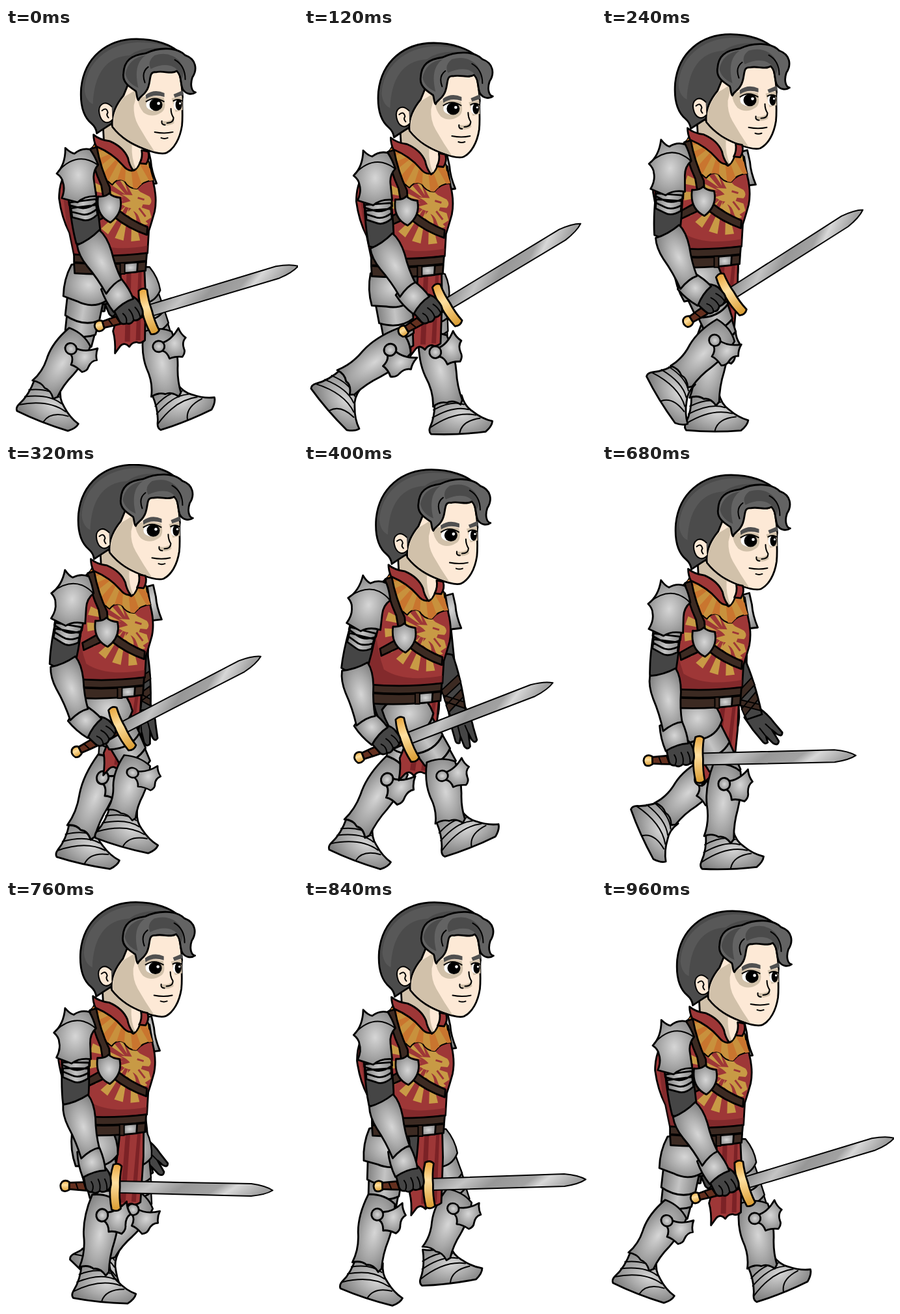
Recreate the animation shown at these times as an HTML page. Size 449 by 627 pixels, loop 1 s.

```html
<!DOCTYPE html>
<html lang="en">
<head>
<meta charset="utf-8">
<title>Walking knight</title>
<style>
  html, body { margin: 0; width: 100%; height: 100%; overflow: hidden; background: #fff; }
  svg { display: block; width: 449px; height: 627px; }
  .ink { stroke: #000; stroke-width: 2.8; stroke-linejoin: round; stroke-linecap: round; }
  .thin { stroke: #000; stroke-width: 2; stroke-linejoin: round; stroke-linecap: round; }
  .line { fill: none; }
  .steel { fill: url(#steel); }
  .plate { fill: url(#plate); }
  .cloth { fill: #454545; }
  .red { fill: #9e3737; }
  .strap { fill: #3c2a22; }
  .gold { fill: url(#gold); }
  .skin { fill: #fde9d6; }
  .shade { fill: #d1c1aa; }
  .hair { fill: #4b4b4b; }
  .lock { fill: #636363; }
</style>
</head>
<body>
<svg viewBox="0 0 449 627">
  <defs>
    <radialGradient id="steel" cx=".52" cy=".5" r=".62">
      <stop offset="0" stop-color="#d6d6d6"/><stop offset=".55" stop-color="#a8a8a8"/><stop offset="1" stop-color="#808080"/>
    </radialGradient>
    <linearGradient id="plate" x1="0" x2="1">
      <stop offset="0" stop-color="#7d7d7d"/><stop offset=".5" stop-color="#c4c4c4"/><stop offset="1" stop-color="#858585"/>
    </linearGradient>
    <linearGradient id="blade" x1="0" x2="1" y2=".12">
      <stop offset="0" stop-color="#8c8c8c"/><stop offset=".25" stop-color="#c4c4c4"/><stop offset=".45" stop-color="#979797"/>
      <stop offset=".68" stop-color="#a2a2a2"/><stop offset=".78" stop-color="#d8d8d8"/><stop offset="1" stop-color="#a0a0a0"/>
    </linearGradient>
    <linearGradient id="gold" x2="0" y2="1">
      <stop offset="0" stop-color="#e8a53a"/><stop offset=".4" stop-color="#ffe0a0"/><stop offset="1" stop-color="#d99a2e"/>
    </linearGradient>
    <path id="tunicShape" d="M140 178 L106 208 Q82 225 82 262 Q86 292 98 315 L105 349 Q160 354 218 346 L220 312 Q224 300 229 282 Q233 262 227 238 L222 208 L205 200Z"/>
    <path id="yokeShape" d="M140 172 L130 190 Q141 204 146 214 Q154 236 164 241 Q172 230 182 235 Q190 248 202 247 Q211 235 227 234 Q222 222 220 205 L205 195 L190 190Z"/>
    <clipPath id="tunicClip"><use href="#tunicShape"/></clipPath>
    <clipPath id="yokeClip"><use href="#yokeShape"/></clipPath>

    <g id="thighArt" class="ink plate">
      <path d="M-20 78 Q0 70 24 78 L22 101 Q0 112 -19 101Z"/>
      <path d="M-24 54 Q0 46 27 54 L25 82 Q2 95 -22 83Z"/>
      <path d="M-28 30 Q0 22 28 30 L27 60 Q4 74 -26 61Z"/>
      <path class="steel" d="M-30 -16 Q0 -26 30 -13 Q38 8 33 28 Q14 45 -12 37 L-34 33 Q-38 8 -30 -16Z"/>
    </g>
    <g id="shinArt" class="ink">
      <path class="steel" d="M-24 -14 Q0 -20 19 -8 Q25 18 21 48 Q17 70 20 92 L16 98 Q6 88 -4 91 Q-14 86 -26 92 Q-20 70 -27 46 Q-33 20 -24 -14Z"/>
      <path class="steel" d="M1 8 Q17 6 30 -12 Q32 -2 39 5 Q32 11 34 22 Q36 29 30 35 Q18 32 10 35 Q8 24 1 21Z"/>
      <circle class="steel" cx="-4" cy="13" r="9"/>
    </g>
    <g id="footArt" class="ink">
      <path class="steel" d="M-23 -8 Q-2 -2 19 -11 Q23 6 35 14 Q49 26 65 30 Q64 38 54 46 Q10 50 -30 47 Q-34 43 -31 36 Q-22 18 -23 -8Z"/>
      <path class="line thin" d="M-25 10 Q2 -4 22 3 M-27 22 Q6 4 29 11 M-31 37 Q8 12 40 20 M14 47 Q18 28 46 25"/>
    </g>
  </defs>

  <g id="farArm">
    <g id="farUpper"><path class="cloth ink" d="M-15 0 L15 0 L16 104 Q0 112 -14 102Z"/></g>
    <g id="farHand"><path class="cloth ink" d="M-13 -6 L13 -8 Q20 12 20 26 L22 46 Q18 52 14 44 L11 34 L10 54 Q5 60 1 52 L-2 37 L-5 46 Q-11 47 -11 39 L-13 18Z"/>
      <path class="line thin" d="M8 21 L11 34 M-3 21 L-2 37"/></g>
    <g id="farFore">
      <path class="cloth ink" d="M-16 -7 Q0 -14 15 -5 Q19 30 13 86 L-12 86 Q-15 40 -16 -7Z"/>
      <path class="strap thin" d="M-15 44 L16 27 L17 39 L-14 56Z M-14 68 L15 50 L15 62 L-13 80Z M-14 52 L14 70 L13 80 L-14 62Z"/>
    </g>
  </g>
  <path id="farPauldron" class="steel ink" d="M216 198 L224 207 L235 204 L239 222 Q240 238 248 257 L230 259 L218 250Z"/>

  <g id="farThigh"><use href="#thighArt" transform="scale(.82 1)"/></g>
  <g id="farFoot"><use href="#footArt"/></g>
  <g id="farShin"><use href="#shinArt"/></g>

  <g id="pelvis"><path class="cloth ink" d="M110 365 L212 365 Q216 395 202 416 L150 425 Q118 420 110 365Z"/></g>
  <g id="strip">
    <path class="red ink" d="M177 366 L213 366 L215 410 L214 480 Q207 486 202 483 Q195 482 190 490 Q182 482 176 489 L168 500 Q169 480 165 466 Q176 430 177 366Z"/>
    <path fill="#7b2226" d="M186 370 L193 370 L191 482 L183 482Z M204 372 L209 372 L207 480 L200 480Z"/>
  </g>

  <g id="nearThigh"><use href="#thighArt"/></g>
  <g id="nearFoot"><use href="#footArt"/></g>
  <g id="nearShin"><use href="#shinArt"/></g>

  <g id="torso">
    <use href="#tunicShape" class="red ink"/>
    <g clip-path="url(#tunicClip)">
      <path id="sun" fill="#c89a45"/>
      <path fill="#c89a45" d="M186 240 Q199 243 207 252 L221 259 Q227 266 221 272 L211 271 L209 276 L221 280 L224 291 L215 297 L219 301 Q209 306 206 294 Q203 284 196 281 Q204 294 199 302 Q193 290 185 286 L193 277 Q184 276 178 270 L192 266 Q186 259 178 256 L195 257Z"/>
      <path class="line" stroke="#9e3737" stroke-width="3" d="M203 261 L213 264 M205 277 L215 290"/>
      <path fill="#6b1f22" opacity=".5" d="M80 190 H118 Q108 270 128 325 Q160 346 220 334 V354 H100Z"/>
    </g>
    <use href="#yokeShape" fill="#c8913d" class="thin"/>
    <path id="yokeRays" clip-path="url(#yokeClip)" fill="#c9752f"/>
    <path class="strap ink" d="M130 186 L140 183 Q146 216 160 245 L161 260 L150 260 L147 242 Q134 214 130 186Z"/>
    <path class="strap ink" d="M172 279 Q193 296 218 306 L217 318 Q188 308 166 290Z M147 279 L122 293 L124 304 L152 291Z"/>
    <path class="steel ink" d="M142 259 Q154 260 159 254 Q165 260 176 261 Q181 284 161 299 Q138 288 142 259Z"/>
    <path class="strap ink" d="M105 348 Q160 353 217 346 L216 358 Q160 365 105 360Z M105 361 Q160 366 216 359 L215 373 Q160 381 106 377Z"/>
    <path class="steel ink" d="M180 362 L203 360 L202 375 L180 377Z"/>
    <path class="strap thin" d="M176 361 L183 361 L183 378 L176 378Z"/>
  </g>

  <g id="head">
    <path class="shade ink" d="M148 140 L198 172 L208 196 Q205 214 196 219 Q188 215 185 200 L150 176Z"/>
    <path class="skin" d="M193 180 L210 186 Q207 204 199 216 Q192 200 193 180Z"/>
    <path class="hair ink" d="M139 162 Q138 153 131 147 C113 132 114 105 115 92 C120 45 155 17 200 17 C228 17 256 26 268 40 L268 90 L165 145 L148 156Z"/>
    <path fill="#585858" d="M120 95 C122 54 155 24 202 22 C230 22 250 28 259 34 C228 27 204 31 190 42 C152 44 135 72 133 117 Q122 112 120 95Z"/>
    <path class="skin ink" d="M163 152 C161 137 166 121 180 104 L194 70 L264 62 C270 83 270 94 271 106 C269 114 272 130 270 150 C267 170 258 186 246 192 C238 195 225 191 212 186 C194 179 177 170 163 152Z"/>
    <path class="shade" d="M165 151 C163 137 168 121 181 106 L199 95 Q200 106 196 119 Q195 136 203 150 Q215 171 228 190 C202 181 179 171 165 151Z"/>
    <path class="shade" d="M202 108 Q219 102 242 107 Q247 125 238 130 Q224 139 211 130 Q203 121 202 108Z M254 108 L270 105 L271 126 L260 129Z M239 143 Q251 145 257 138 L258 146 Q248 153 239 147Z"/>
    <path class="skin thin" d="M162 121 C151 110 140 118 143 132 C146 146 156 149 163 141"/>
    <path class="line thin" d="M147 127 Q154 121 156 130 Q153 134 157 138"/>
    <ellipse cx="227" cy="118" rx="12" ry="9" fill="#fff"/>
    <ellipse cx="230" cy="118" rx="10" ry="9.5"/>
    <circle cx="234" cy="116" r="2.3" fill="#fff"/>
    <ellipse cx="263" cy="118" rx="6" ry="8.5" fill="#fff"/>
    <ellipse cx="265" cy="118" rx="5" ry="8.5"/>
    <circle cx="267" cy="116" r="1.6" fill="#fff"/>
    <path class="line thin" d="M215 113 Q228 104 242 113 M257 112 Q263 108 270 112"/>
    <path class="line thin" stroke-width="1.5" d="M253 124 Q253 132 257 138 Q257 146 247 146 M239 143 Q238 149 244 149"/>
    <path fill="#505050" d="M214 103 Q227 93 243 100 L243 106 Q226 101 215 109Z M257 102 L271 96 L272 103 L259 107Z"/>
    <path class="line thin" d="M228 160 Q243 163 256 160 M238 169 Q243 171 248 169"/>
    <path class="lock ink" d="M180 70 C181 50 192 42 214 39 C235 29 262 29 275 42 C292 48 294 64 286 76 C282 88 285 98 291 99 C284 104 275 101 271 94 C267 84 270 74 262 66 C254 72 241 65 230 68 C217 66 224 85 215 97 C211 104 205 105 203 111 C200 108 201 101 199 97 C190 91 178 84 180 70Z"/>
    <path class="hair" d="M183 70 Q188 46 214 42 Q194 56 203 92 Q186 85 183 70Z M228 42 Q252 35 267 52 Q276 66 270 78 Q266 62 252 58 Q238 55 222 63 Q216 51 228 42Z"/>
    <path class="line thin" d="M218 60 Q207 68 213 84 M259 49 Q275 58 275 79"/>
  </g>

  <g id="collar">
    <path class="red ink" d="M135 164 Q144 172 160 174 Q181 183 188 200 Q190 211 196 219 Q188 221 180 211 Q165 193 139 182Q135 173 135 164Z"/>
    <path class="red ink" d="M209 188 L219 190 Q222 200 216 209 L206 208 Q211 199 209 188Z"/>
  </g>

  <g id="sword">
    <path class="thin" fill="url(#blade)" d="M4 -9 L208 -9.5 Q230 -7 241 0 Q230 7 208 9.5 L4 9Z"/>
    <path class="ink" fill="#65301f" d="M-72 -5 Q-38 -8 -6 -5 L-6 6 Q-38 8 -72 5Z"/>
    <path class="line thin" d="M-62 -5 L-58 6 M-50 -6 L-46 6 M-20 -6 L-17 6"/>
    <path class="gold ink" d="M-72 -6 Q-78 -10 -83 -6 Q-88 0 -83 7 Q-78 10 -72 6Z"/>
    <path class="gold ink" d="M-5 -34 Q3 -38 8 -32 Q5 -15 6 0 Q5 17 8 33 Q2 39 -6 35 Q-10 16 -9 0 Q-10 -17 -5 -34Z"/>
  </g>
  <g id="nearHand">
    <path class="cloth ink" d="M-14 25 L18 22 Q29 33 27 46 Q27 59 19 61 Q12 64 8 60 Q1 65 -4 60 Q-13 60 -13 50Z"/>
    <path class="line thin" d="M18 43 Q21 51 19 60 M8 42 Q11 51 8 59 M-3 44 Q1 52 -4 59"/>
    <path class="steel ink" d="M-18 -4 Q0 -10 17 -5 Q22 14 21 30 Q4 28 -15 36 Q-20 16 -18 -4Z"/>
  </g>
  <g id="nearUpper">
    <path class="cloth ink" d="M-20 35 L20 35 Q23 76 20 106 Q0 114 -18 107 Q-22 78 -20 35Z"/>
    <path class="plate ink" d="M-19 52 L20 52 L20 67 Q6 77 -4 72 L-19 66Z M-20 43 L21 43 L21 58 Q6 68 -5 63 L-20 57Z M-21 32 L22 32 L22 48 Q6 58 -6 53 L-21 47Z"/>
  </g>
  <g id="nearFore"><path class="steel ink" d="M-20 5 Q0 7 21 0 Q27 14 23 37 Q17 62 17 83 Q4 82 -14 92 Q-15 65 -21 40 Q-25 20 -20 5Z"/></g>
  <g id="nearPauldron">
    <path class="steel ink" d="M-20 -39 Q-12 -31 -6 -30 Q5 -39 18 -36 Q25 -26 30 -12 Q21 -2 23 12 L26 36 Q8 35 -3 45 L-27 38 Q-21 24 -25 13 Q-26 6 -34 0 Q-20 -14 -20 -39Z"/>
    <path class="line thin" d="M-32 -3 Q-12 -25 10 -21 Q22 -18 29 -12"/>
  </g>
</svg>
<script>
const el = id => document.getElementById(id);
const PERIOD = 960, STEP = 40, TAU = 2 * Math.PI;
const RAD = Math.PI / 180;

// Harmonic series: mean, then a cosine and sine weight for each harmonic
const wave = (p, mean, ...w) => w.reduce((sum, k, i) => {
  const a = p * (1 + (i >> 1));
  return sum + k * (i % 2 ? Math.sin(a) : Math.cos(a));
}, mean);

function place(id, x, y, angle = 0, stretch = 1) {
  el(id).setAttribute("transform", `translate(${x} ${y}) rotate(${angle}) scale(1 ${stretch})`);
}
function bone(id, a, b, length) {
  const dx = b.x - a.x, dy = b.y - a.y;
  place(id, a.x, a.y, -Math.atan2(dx, dy) / RAD, Math.hypot(dx, dy) / length);
}
const reach = (p, angle, length) => ({
  x: p.x - Math.sin(angle * RAD) * length,
  y: p.y + Math.cos(angle * RAD) * length
});

// One gait serves both legs, half a cycle apart; sway is the turn of the pelvis
function leg(side, p, hip, sway) {
  const knee = { x: wave(p, 176.4, 57.5, -5.3, -3, -2) + sway, y: wave(p, 477.5, -4.2, .4, 3.3, 9.5) };
  const ankle = { x: wave(p, 149, 93.4, 18.1, 6.7, -4), y: wave(p, 557, 3.4, 17.3, 2.6, 4.5) };
  bone(side + "Thigh", hip, knee, 100);
  bone(side + "Shin", knee, ankle, 92);
  place(side + "Foot", ankle.x, ankle.y, wave(p, 15.3, -24.3, -19.3, -14.8, 8.8, 2.8, 9.8));
}

function nearArm(p, bob) {
  const upper = wave(p, 4, -11.5);
  const fore = wave(p, -17, -10, -5);
  const hand = wave(p, -27, 2.5, -19);
  const blade = wave(p, -16, -.7, -16.5, 0, -3);
  const shoulder = { x: wave(p, 106, 6), y: 223 + bob };
  const elbow = reach(shoulder, upper, 98);
  const wrist = reach(elbow, fore, 87);
  const guard = reach(reach(wrist, hand, 52), blade - 90, 34);
  place("nearUpper", shoulder.x, shoulder.y, upper);
  place("nearPauldron", shoulder.x, shoulder.y, upper * .7 + 4);
  place("nearFore", elbow.x, elbow.y, fore);
  place("nearHand", wrist.x, wrist.y, hand);
  place("sword", guard.x, guard.y, blade);
}

function farArm(p, drift, bob) {
  const shoulder = { x: 212 + drift, y: 222 + bob };
  const elbow = { x: wave(p, 193, -29, -6), y: 311 + bob };
  const wrist = { x: wave(p, 200, -53, -20), y: 389 + bob * .7 };
  bone("farUpper", shoulder, elbow, 98);
  bone("farFore", elbow, wrist, 84);
  place("farHand", wrist.x, wrist.y, wave(p, -16, 4, 18));
  place("farPauldron", drift + wave(p, -8, -8), bob + wave(p, -6, -12));
}

function draw(t) {
  const p = t / PERIOD * TAU;
  const drift = wave(p, -2.7, 2.3, -.8);
  const bob = wave(2 * p, -5.2, 5.1, 9.7, 0, -2.2);
  const twist = Math.cos(p + 15 * RAD);
  const sway = 3 + 12 * Math.cos(2 * p - 285 * RAD);

  for (const id of ["torso", "collar", "pelvis"]) place(id, drift, bob);
  place("head", drift + 1, bob + 1.5 - 1.5 * Math.cos(2 * p));
  el("strip").setAttribute("transform",
    `translate(${drift} ${bob}) rotate(${wave(p, 4, -4)} 195 366)`);
  leg("far", p, { x: 184 + 19 * twist, y: 388 + bob }, sway);
  leg("near", p + Math.PI, { x: 141 - 14 * twist, y: 385 + bob }, -sway);
  farArm(p, drift, bob);
  nearArm(p, bob);
}

function rays(cx, cy, inner, outer, from, to, step) {
  const at = (deg, r) => `${cx + r * Math.cos(deg * RAD)} ${cy + r * Math.sin(deg * RAD)}`;
  let d = "";
  for (let a = from; a <= to; a += step)
    d += `M${at(a, inner)}L${at(a - step * .27, outer)}L${at(a + step * .27, outer)}Z`;
  return d;
}
el("sun").setAttribute("d", rays(193, 264, 12, 64, 84, 268, 23));
el("yokeRays").setAttribute("d", rays(188, 180, 8, 90, 5, 190, 24));

function tick() {
  const t = Math.floor(performance.now() % 1000 / STEP) * STEP;
  draw(t % PERIOD);
  requestAnimationFrame(tick);
}
tick();
</script>
</body>
</html>
```
